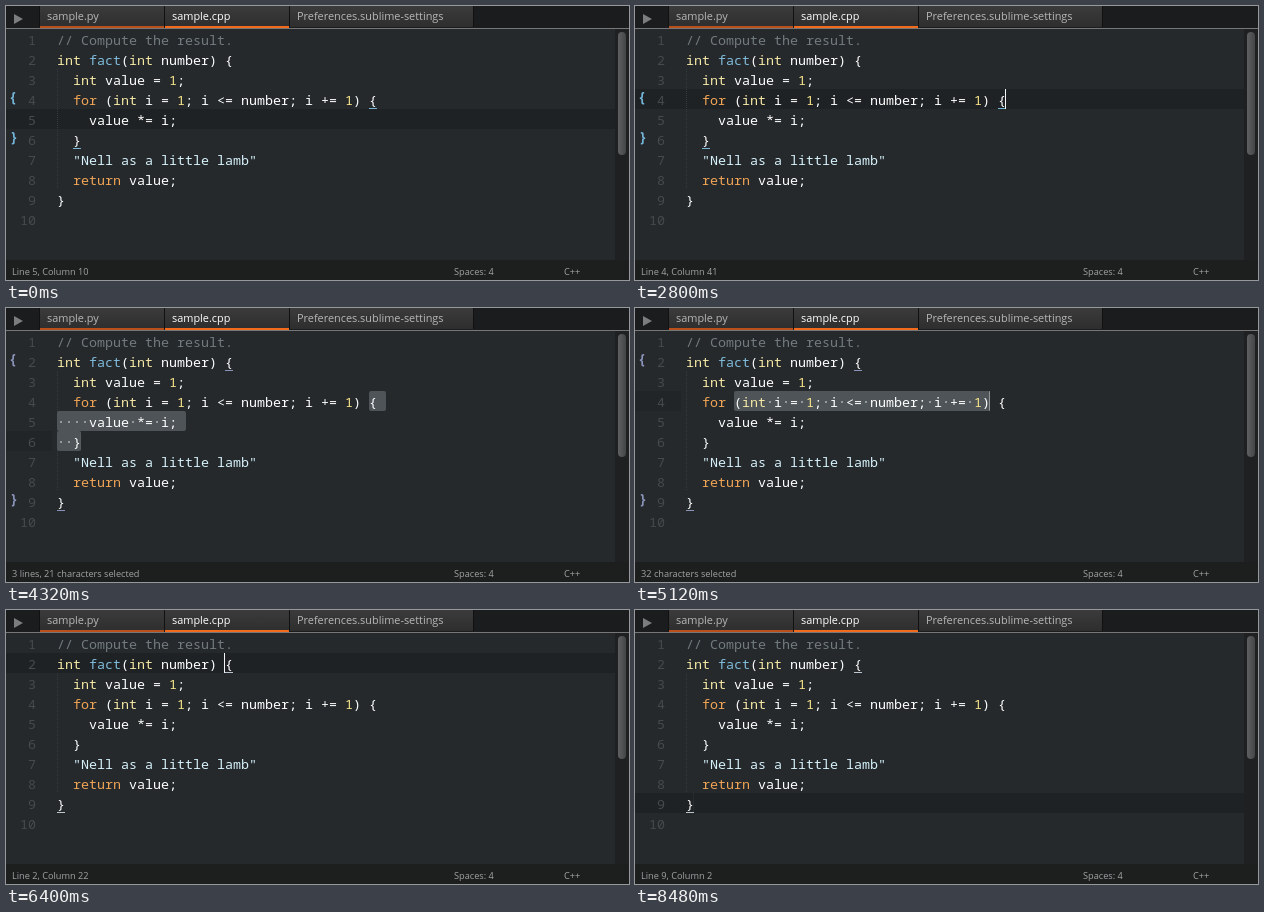
An HTML page for the animation above (8.72 s loop, 623 px wide and 274 px high).

```html
<!DOCTYPE html>
<html lang="en">
<head>
<meta charset="utf-8">
<title>Bracket selection</title>
<style>
html, body { margin: 0; width: 100%; height: 100%; overflow: hidden; background: #25292c; }
svg { display: block; width: 623px; height: 274px; }
text { white-space: pre; }
.code { font: 13.333px "Noto Sans Mono", "DejaVu Sans Mono", monospace; fill: #fff; }
.num { fill: #454a4d; text-anchor: end; }
.comment { fill: #727b7f; }
.string { fill: #d6f1fa; }
.type { fill: #f6e9a6; }
.word { fill: #f0a455; }
.func { fill: #80bcdc; }
.digit { fill: #f8e58a; }
.tab { font: 10.9px "Open Sans", "Noto Sans", sans-serif; fill: #b8b8b8; }
.status { font: 9.2px "Open Sans", "Noto Sans", sans-serif; fill: #a2a4a5; }
.brace { font-weight: bold; }
#fill { fill: #4e5457; }
#dots { fill: #939a9d; }
</style>
</head>
<body>
<svg viewBox="0 0 623 274">
  <defs>
    <linearGradient id="tabs" x2="0" y2="1">
      <stop stop-color="#3b3b3b"/><stop offset="1" stop-color="#2e2e2e"/>
    </linearGradient>
    <linearGradient id="thumb">
      <stop stop-color="#5e6062"/><stop offset="1" stop-color="#434546"/>
    </linearGradient>
  </defs>

  <rect width="623" height="274" fill="#25292c"/>
  <rect id="row" width="609" height="20" fill="#1f2224"/>
  <path d="M51.5 63V183" stroke="#343a3d" stroke-dasharray="1 1"/>
  <g id="fill"></g>
  <g id="dots"></g>
  <g id="lines" class="code"></g>
  <g id="marks" class="code"></g>
  <rect id="caret" width="1" height="20" fill="#f4f6f6"/>

  <rect width="623" height="23" fill="#1b1c1d"/>
  <rect x="34" width="433" height="21" fill="url(#tabs)"/>
  <path d="M33.5 0V21M158.5 0V21M283.5 0V21M467.5 0V21" stroke="#111"/>
  <path d="M0 22.5H623" stroke="#777"/>
  <path d="M34 21H158" stroke="#b9501c" stroke-width="2"/>
  <path d="M159 21H283" stroke="#f26a1b" stroke-width="2"/>
  <path d="M8 8L17 13L8 18Z" fill="#7b7d7e"/>
  <text class="tab" x="41" y="14">sample.py</text>
  <text class="tab" x="166" y="14" style="fill:#fff">sample.cpp</text>
  <text class="tab" x="291" y="14">Preferences.sublime-settings</text>

  <rect x="609" y="23" width="14" height="231" fill="#1e2022"/>
  <rect x="612" y="26" width="8" height="123" rx="4" fill="url(#thumb)"/>

  <rect y="254" width="623" height="20" fill="#1d1e1e"/>
  <text id="status" class="status" x="6" y="269"></text>
  <text class="status" x="448" y="269">Spaces: 4</text>
  <text class="status" x="558" y="269">C++</text>
</svg>
<script>
const LOOP = 8720, STEP = 80, BLINK = 1040;
const LEFT = 51, CHAR = 8, ROW = 20;
const code = [
  '// Compute the result.',
  'int fact(int number) {',
  '  int value = 1;',
  '  for (int i = 1; i <= number; i += 1) {',
  '    value *= i;',
  '  }',
  '  "Nell as a little lamb"',
  '  return value;',
  '}',
  ''
];
const inner = [[4, 39], [6, 2]], outer = [[2, 21], [9, 0]];
const blue = '#74b5d8', slate = '#8a93b8', pale = '#b9c6cc';

// caret is [line, column]; sel runs from one [line, column] to another
const states = [
  { at: 0, blink: -680, caret: [5, 9], pair: inner, tint: blue, gutter: true },
  { at: 880, caret: [6, 2], pair: inner, tint: blue, gutter: true },
  { at: 1760, caret: [4, 40], pair: inner, tint: blue, gutter: true },
  { at: 3040, sel: [[4, 40], [6, 2]], pair: inner, tint: blue, gutter: true },
  { at: 3840, sel: [[4, 39], [6, 3]], pair: outer, tint: slate, gutter: true },
  { at: 4720, sel: [[4, 6], [4, 38]], pair: outer, tint: slate, gutter: true },
  { at: 5440, sel: [[2, 22], [9, 0]], pair: outer, tint: pale },
  { at: 6160, sel: [[2, 21], [9, 1]] },
  { at: 6400, caret: [2, 21], pair: outer, tint: pale },
  { at: 6960, caret: [9, 1], pair: outer, tint: pale }
];

const el = id => document.getElementById(id);
const x = col => LEFT + col * CHAR;
const y = line => 23 + (line - 1) * ROW;

const kinds = ['comment', 'string', 'type', 'word', 'func', 'digit'];
const tokens = /(\/\/.*)|(".*")|\b(int)\b|\b(for|return)\b|\b(fact)\b|\b(\d)\b/g;
const paint = text => text.replace(/</g, '&lt;').replace(tokens, (all, ...groups) =>
  `<tspan class="${kinds[groups.findIndex(Boolean)]}">${all}</tspan>`);

el('lines').innerHTML = code.map((text, i) => {
  const base = y(i + 1) + 16;
  return `<text class="num" x="30" y="${base}">${i + 1}</text>` +
    `<text x="${LEFT}" y="${base}">${paint(text)}</text>`;
}).join('');

function selection([[l1, c1], [l2, c2]]) {
  let rects = '', dots = '', count = 0;
  for (let line = l1; line <= l2; line++) {
    const text = code[line - 1];
    const from = line === l1 ? c1 : 0;
    const to = line === l2 ? c2 : text.length;
    const tail = line < l2 ? 9 : 0;
    count += to - from + (tail ? 1 : 0);
    const width = (to - from) * CHAR + tail;
    if (width) rects += `<rect x="${x(from)}" y="${y(line)}" width="${width}" height="${ROW}" rx="2"/>`;
    for (let c = from; c < to; c++) {
      if (text[c] === ' ') dots += `<rect x="${x(c) + 3}" y="${y(line) + 10}" width="2" height="2"/>`;
    }
  }
  const lines = l2 > l1 ? `${l2 - l1 + 1} lines, ` : '';
  return { rects, dots, label: `${lines}${count} characters selected` };
}

function marks({ pair = [], tint, gutter }) {
  return pair.map(([line, col], i) =>
    `<rect x="${x(col)}" y="${y(line) + 19}" width="8" height="1" fill="${tint}"/>` +
    (gutter ? `<text class="brace" x="${3 + i}" y="${y(line) + 13}" style="fill:${tint}">${'{}'[i]}</text>` : '')
  ).join('');
}

let shown;
function show(state) {
  shown = state;
  const { sel } = state;
  const [line, col] = sel ? sel[1] : state.caret;
  const drawn = sel ? selection(sel)
    : { rects: '', dots: '', label: `Line ${line}, Column ${col + 1}` };
  el('fill').innerHTML = drawn.rects;
  el('dots').innerHTML = drawn.dots;
  el('status').textContent = drawn.label;
  el('marks').innerHTML = marks(state);
  el('row').setAttribute('y', y(line));
  el('row').setAttribute('width', sel ? 46 : 609);
  el('row').setAttribute('opacity', sel ? 0.5 : 1);
  el('caret').setAttribute('x', x(col) - 1);
  el('caret').setAttribute('y', y(line));
}

function draw(now) {
  const t = Math.floor(now % LOOP / STEP) * STEP;
  const state = states.filter(s => s.at <= t).pop();
  if (state !== shown) show(state);
  const phase = (t - (state.blink ?? state.at) - 120) / BLINK;
  const glow = 0.5 + 0.8 * Math.cos(2 * Math.PI * phase);
  el('caret').setAttribute('opacity', Math.min(1, Math.max(0, glow)));
}

const start = performance.now();
function tick() {
  draw(performance.now() - start);
  requestAnimationFrame(tick);
}
tick();
</script>
</body>
</html>
```
